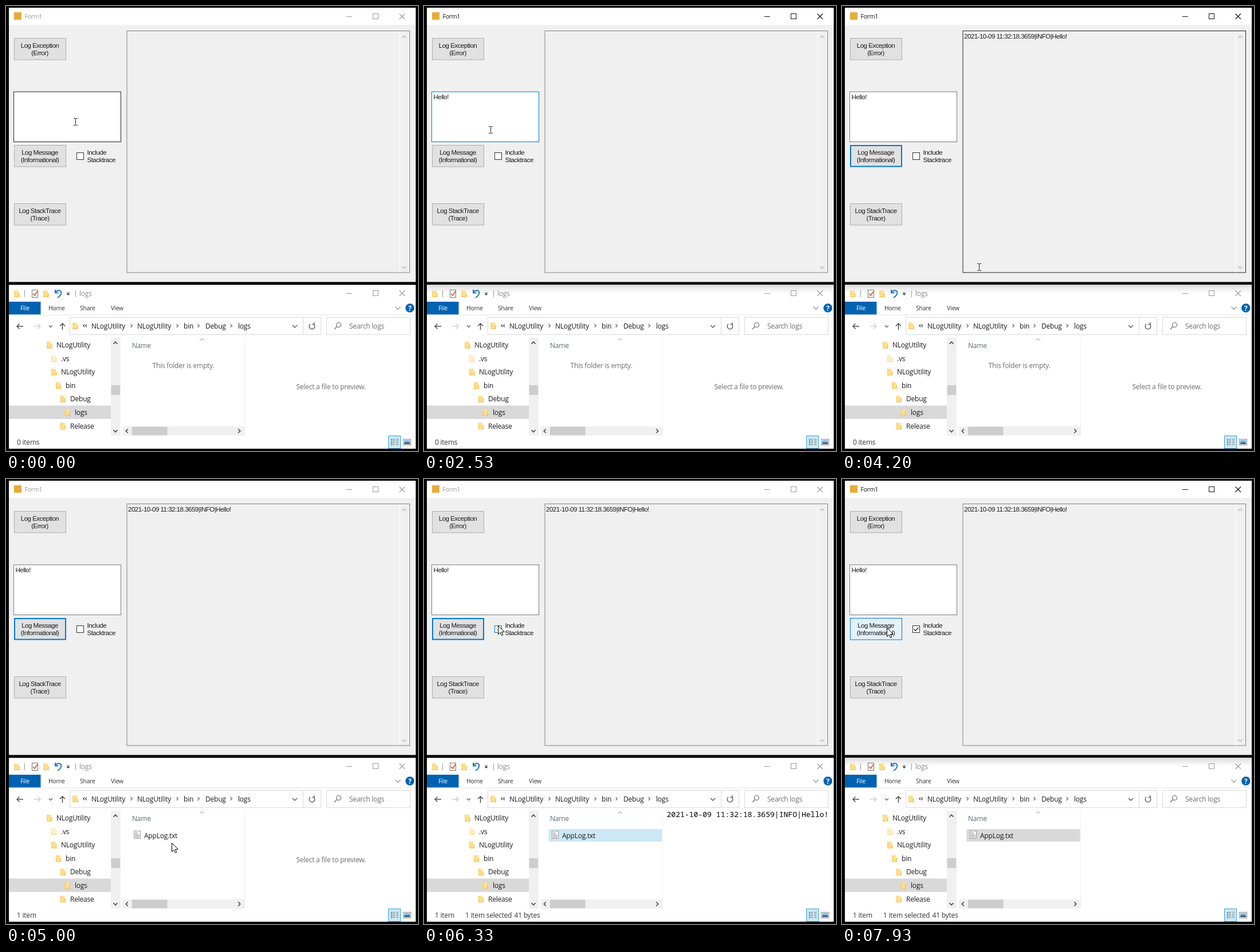
An HTML page with a canvas that plays this animation: 719x778 px, repeating every 8 s.

```html
<!DOCTYPE html>
<html lang="en">
<head>
<meta charset="utf-8">
<title>Log form and folder window</title>
<style>
html, body { margin: 0; width: 100%; height: 100%; overflow: hidden; background: #000; }
canvas { display: block; }
</style>
</head>
<body>
<canvas id="stage" width="719" height="778"></canvas>
<script>
const ctx = document.getElementById('stage').getContext('2d');
const LOOP = 8000, STEP = 1000 / 15;
const BLUE = '#0078d7', GREY = '#7a7a7a', FACE = '#f0f0f0';
const LOG = '2021-10-09 11:32:18.3659|INFO|Hello!';
const FORM_FONT = ['11.5px "Liberation Sans", Arial, sans-serif', '-0.5px'];
const UI_FONT = ['12px "Open Sans", "Noto Sans", sans-serif', '-0.22px'];
const SMALL_FONT = ['10.5px "Open Sans", "Noto Sans", sans-serif', '-0.25px'];
const MONO_FONT = ['13.08px "Noto Sans Mono", "DejaVu Sans Mono", monospace', '0px'];

// Pointer stops: time, x, y
const PATH = [
  [0, 121, 202], [2400, 121, 202], [2600, 113, 222], [2930, 80, 278],
  [3200, 69, 264], [3800, 69, 264], [3930, 98, 298], [4200, 239, 454],
  [4330, 252, 533], [4600, 252, 533], [4870, 285, 652], [5130, 293, 620],
  [5870, 293, 620], [6070, 235, 490], [6330, 129, 256], [7130, 129, 256],
  [7330, 103, 262], [7530, 78, 260], [8000, 78, 260]
];
// Typed letters and when they land
const KEYS = [1000, 1200, 1270, 1400, 1600, 1870];

function rect(x, y, w, h, fill) {
  ctx.fillStyle = fill;
  ctx.fillRect(x, y, w, h);
}

function box(x, y, w, h, fill, line, lw = 1) {
  rect(x, y, w, h, line);
  rect(x + lw, y + lw, w - 2 * lw, h - 2 * lw, fill);
}

function text(str, x, y, font = UI_FONT, color = '#1a1a1a', align = 'left') {
  ctx.font = font[0];
  ctx.letterSpacing = font[1];
  ctx.fillStyle = color;
  ctx.textAlign = align;
  ctx.fillText(str, x, y);
}

function line(color, width, ...pts) {
  ctx.strokeStyle = color;
  ctx.lineWidth = width;
  ctx.beginPath();
  for (let i = 0; i < pts.length; i += 2) ctx.lineTo(pts[i], pts[i + 1]);
  ctx.stroke();
}

function chevron(x, y, dir, color, size = 3.5, width = 1.3) {
  const d = size / 2;
  if (dir === 'up') line(color, width, x - size, y + d, x, y - d, x + size, y + d);
  if (dir === 'down') line(color, width, x - size, y - d, x, y + d, x + size, y - d);
  if (dir === 'left') line(color, width, x + d, y - size, x - d, y, x + d, y + size);
  if (dir === 'right') line(color, width, x - d, y - size, x + d, y, x - d, y + size);
}

function folder(x, y, alpha = 1) {
  ctx.globalAlpha = alpha;
  rect(x - 4.5, y - 5.5, 7.5, 11.5, '#ffdf8a');
  rect(x - 4.5, y - 5.5, 1, 11.5, '#f3c75c');
  rect(x + 3, y - 1, 1.5, 7, '#f0c050');
  rect(x - 4.5, y + 5, 9, 1, '#efc155');
  ctx.globalAlpha = 1;
}

function windowButtons(y, color) {
  line(color, 1, 594, y + .5, 604, y + .5);
  ctx.strokeRect(640.5, y - 4.5, 9, 9);
  line(color, 1.1, 686.5, y - 4.5, 696, y + 5);
  line(color, 1.1, 696, y - 4.5, 686.5, y + 5);
}

function pointerAt(t) {
  let i = 1;
  while (i < PATH.length - 1 && PATH[i][0] < t) i++;
  const [t0, x0, y0] = PATH[i - 1], [t1, x1, y1] = PATH[i];
  const k = Math.min(1, Math.max(0, (t - t0) / (t1 - t0)));
  return { x: x0 + (x1 - x0) * k, y: y0 + (y1 - y0) * k };
}

const inside = (p, x, y, w, h) => p.x >= x && p.x < x + w && p.y >= y && p.y < y + h;

function button(y, first, second, state) {
  const fill = { hover: '#e5f1fb', down: '#cce4f7' }[state] || '#e1e1e1';
  const edge = { hover: BLUE, focus: BLUE, down: '#005499' }[state] || '#adadad';
  box(14, y, 91, 38.5, fill, edge, state === 'focus' ? 2 : 1);
  text(first, 59, y + 17, FORM_FONT, '#1a1a1a', 'center');
  text(second, 59, y + 30, FORM_FONT, '#1a1a1a', 'center');
}

function messageBox(t, p) {
  const focused = t >= 200 && t < 3200;
  let edge = GREY;
  if (focused) edge = BLUE;
  else if (t >= 3200 && t < 3460) edge = t < 3330 ? '#2f86c8' : '#5a83a3';
  else if (inside(p, 13, 149, 188, 89)) edge = '#222';
  box(13, 149.5, 188, 88.5, '#fff', edge);

  const typed = 'Hello!'.slice(0, KEYS.filter(k => t >= k).length);
  text(typed, 16.5, 163, FORM_FONT, '#1a1a1a');
  const lastKey = KEYS.filter(k => t >= k).pop() || 400;
  const caretOn = t >= 400 && t < 3200 && Math.floor((t - lastKey) / 530) % 2 === 0;
  if (caretOn) rect(Math.round(16.5 + ctx.measureText(typed).width), 153, 1, 12, '#000');
}

function checkBox(t, p) {
  const hover = inside(p, 122, 250, 75, 25);
  const down = t >= 6730 && t < 6865;
  const color = down ? '#005499' : hover ? BLUE : '#333';
  box(123, 256, 13, 13, down ? '#cce4f7' : '#fff', color);
  if (t >= 6865) line(color, 1.4, 125.5, 262.5, 128.3, 265.3, 133.5, 259.5);
  text('Include', 141.5, 260, FORM_FONT, '#1a1a1a');
  text('Stacktrace', 141.5, 272.5, FORM_FONT, '#1a1a1a');
}

function drawForm(t, p, active) {
  rect(5, 3, 710, 479.5, FACE);
  rect(5, 3, 710, 30, '#fff');
  rect(14, 11, 13, 13, '#e5ab3c');
  text('Form1', 32.5, 22, SMALL_FONT, active ? '#111' : '#999');
  windowButtons(18, active ? '#111' : '#999');

  let state = 'plain';
  if (inside(p, 14, 243, 91, 39)) {
    state = (t >= 3200 && t < 3260) || (t >= 7865 && t < 7925) ? 'down' : 'hover';
  } else if (t >= 3200 && t < 6730) state = 'focus';
  button(56, 'Log Exception', '(Error)');
  messageBox(t, p);
  button(243, 'Log Message', '(Informational)', state);
  checkBox(t, p);
  button(345, 'Log StackTrace', '(Trace)');

  const hover = inside(p, 211, 43, 494, 424) && active;
  box(210.5, 43, 494.5, 423.5, FACE, hover ? '#222' : '#828282');
  rect(686, 44, 2, 421.5, '#f7f7f7');
  chevron(695, 54, 'up', '#bcbcbc', 3.5, 1.6);
  chevron(695, 457, 'down', '#bcbcbc', 3.5, 1.6);
  if (t >= 3260) text(LOG, 213, 56.5, FORM_FONT, '#1a1a1a');
}

function titleAndRibbon(active) {
  if (active) {
    const shade = ctx.createLinearGradient(0, 488, 0, 502);
    shade.addColorStop(0, '#dedede');
    shade.addColorStop(1, '#fff');
    rect(5, 487.5, 710, 14.5, shade);
  }
  folder(19, 503);
  rect(32, 497, 1, 12, '#999');
  box(45, 496, 11, 14, '#fff', '#777');
  line('#d05a2b', 1.7, 47, 503, 50, 506, 55, 499);
  folder(70, 503);
  ctx.strokeStyle = '#2474bd';
  ctx.lineWidth = 2;
  ctx.beginPath();
  ctx.moveTo(86, 501);
  ctx.bezierCurveTo(91, 495, 98, 497, 96, 503);
  ctx.quadraticCurveTo(95, 507, 90, 510);
  ctx.stroke();
  line('#2474bd', 2, 86, 496, 86, 501.5, 91.5, 501.5);
  rect(106, 501, 5, 1, '#333');
  ctx.fillStyle = '#333';
  ctx.beginPath();
  ctx.moveTo(105.5, 503);
  ctx.lineTo(111.5, 503);
  ctx.lineTo(108.5, 506);
  ctx.fill();
  rect(121, 497, 1, 12, '#999');
  text('logs', 128, 507, UI_FONT, '#888');
  windowButtons(502, '#999');

  rect(5, 517, 55.5, 22.5, '#0063b1');
  text('File', 33, 532, SMALL_FONT, '#fff', 'center');
  text('Home', 74, 532, SMALL_FONT, '#333');
  text('Share', 129, 532, SMALL_FONT, '#333');
  text('View', 183, 532, SMALL_FONT, '#333');
  rect(5, 539.5, 710, 1, '#e3e3e3');
  chevron(684, 528, 'down', '#999', 4.5);
  ctx.fillStyle = '#0063b1';
  ctx.beginPath();
  ctx.arc(704.8, 528, 7.7, 0, 7);
  ctx.fill();
  text('?', 704.8, 532.5, ['bold 12px "Open Sans", sans-serif', '0px'], '#fff', 'center');
}

function addressRow() {
  line('#444', 1.4, 30, 560, 19, 560);
  line('#444', 1.4, 23.5, 555.5, 19, 560, 23.5, 564.5);
  line('#ccc', 1.4, 49, 560, 60, 560);
  line('#ccc', 1.4, 55.5, 555.5, 60, 560, 55.5, 564.5);
  chevron(78, 560, 'down', '#666', 3, 1.4);
  line('#444', 1.4, 98.5, 566, 98.5, 555);
  line('#444', 1.4, 94, 559.5, 98.5, 555, 103, 559.5);

  box(111, 544, 439, 31, '#fff', '#d9d9d9');
  rect(518, 545, 1, 29, '#d9d9d9');
  folder(121, 559);
  chevron(136, 559, 'left', '#333', 2.4, 1.1);
  chevron(139.7, 559, 'left', '#333', 2.4, 1.1);
  const crumbs = [['NLogUtility', 149], ['NLogUtility', 229], ['bin', 310], ['Debug', 348], ['logs', 405]];
  for (const [name, x] of crumbs) text(name, x, 564);
  for (const x of [219, 299, 336, 393]) chevron(x, 559, 'right', '#555', 2.8, 1.1);
  chevron(504, 560, 'down', '#555', 4);
  ctx.strokeStyle = '#555';
  ctx.lineWidth = 1.3;
  ctx.beginPath();
  ctx.arc(534, 560, 4.8, -.7, 4.1);
  ctx.stroke();
  line('#555', 1.3, 534.5, 556.5, 538, 556.5, 538, 553);

  box(559, 544, 147, 31, '#fff', '#d9d9d9');
  ctx.strokeStyle = '#666';
  ctx.lineWidth = 1.1;
  ctx.beginPath();
  ctx.arc(580.5, 557.5, 4, 0, 7);
  ctx.stroke();
  line('#666', 1.2, 577.5, 560.5, 573, 565);
  text('Search logs', 599, 564, UI_FONT, '#6d6d6d');
}

function tree() {
  const rows = [['NLogUtility', 0], ['.vs', 1], ['NLogUtility', 1], ['bin', 2], ['Debug', 3], ['logs', 4], ['Release', 3]];
  rect(5, 698.5, 178, 23.5, '#d9d9d9');
  rows.forEach(([name, depth], i) => {
    const y = 592.5 + i * 23.6;
    folder(76 + depth * 7.8, y, name === '.vs' ? .5 : 1);
    text(name, 88 + depth * 8, y + 4.5);
  });
  rect(183, 580, 17, 171, FACE);
  rect(183.5, 663, 15.5, 17, '#cdcdcd');
  chevron(191, 589, 'up', '#444', 3.5, 1.6);
  chevron(191, 743, 'down', '#444', 3.5, 1.6);
}

function fileList(t, p, active) {
  chevron(342, 583, 'up', '#888', 3.5, 1);
  text('Name', 220, 598, UI_FONT, '#5c6770');
  rect(416, 580, 1, 171, '#f0f0f0');
  rect(204, 735, 212, 16, FACE);
  rect(220, 735.5, 61.5, 15, '#cdcdcd');
  chevron(211, 743, 'left', '#444', 3.5, 1.6);
  chevron(407, 743, 'right', '#444', 3.5, 1.6);

  const listed = t >= 4930, picked = t >= 5260;
  if (!listed) text('This folder is empty.', 309.5, 633, UI_FONT, '#6d6d6d', 'center');
  else {
    const hover = inside(p, 218, 612, 197, 22);
    if (picked) {
      const fill = active ? '#d9d9d9' : '#cce8f7';
      box(217.5, 612, 198, 22, fill, hover ? '#99d1f5' : fill);
    } else if (hover) rect(217.5, 612, 198, 22, '#e5f3ff');
    box(223, 615, 12, 14, '#fff', '#999');
    for (let y = 618; y < 628; y += 2) rect(225, y, y < 621 ? 5 : 8, 1, '#999');
    text('AppLog.txt', 241, 627.5);
  }
  if (!picked) text('Select a file to preview.', 567, 670, UI_FONT, '#6d6d6d', 'center');
  else if (t >= 5330 && t < 7865) text(LOG, 423.5, 590.5, MONO_FONT, '#000');

  text(listed ? '1 item' : '0 items', 19, 767, UI_FONT, '#333');
  if (picked) {
    text('1 item selected', 72, 767, UI_FONT, '#333');
    text('41 bytes', 157.5, 767, UI_FONT, '#333');
  }
}

function viewIcons() {
  box(667, 751, 22, 23, '#cce8f7', '#3aa5d5');
  for (let i = 0; i < 4; i++) {
    rect(672, 757 + i * 3, 2, 2, '#777');
    rect(675, 757 + i * 3, 4, 1, '#777');
    rect(681, 757 + i * 3, 4, 1, '#777');
  }
  box(693, 757, 14, 11, '#fff', '#888');
  rect(695, 759, 10, 7, '#79b7e5');
  rect(695, 763, 10, 3, '#345c7c');
}

function drawExplorer(t, p, active) {
  rect(5, 487.5, 710, 286.5, '#fff');
  titleAndRibbon(active);
  addressRow();
  tree();
  fileList(t, p, active);
  viewIcons();
}

function arrow(x, y) {
  const pts = [0, 0, 0, 15, 3.5, 11.8, 6, 17, 8.3, 16, 6, 11, 10.7, 10.7];
  ctx.beginPath();
  for (let i = 0; i < pts.length; i += 2) ctx.lineTo(x + pts[i], y + pts[i + 1]);
  ctx.closePath();
  ctx.fillStyle = '#fff';
  ctx.fill();
  ctx.strokeStyle = '#000';
  ctx.lineWidth = 1;
  ctx.stroke();
}

function beam(x, y) {
  rect(x, y - 5, 1, 11, '#222');
  for (const end of [-6, 6]) {
    rect(x - 3, y + end, 3, 1, '#222');
    rect(x + 1, y + end, 3, 1, '#222');
  }
}

function drawPointer(t, p) {
  if (t >= 995 && t < 2395) return;
  const x = Math.round(p.x), y = Math.round(p.y);
  const onText = inside(p, 13, 149, 188, 89) || inside(p, 211, 43, 475, 424);
  if (onText) beam(x, y);
  else arrow(x + .5, y + .5);
}

function draw(time) {
  // The picture advances at 15 steps a second
  const t = Math.floor((time + 5) / STEP) * STEP + 4;
  const p = pointerAt(t);
  const active = (t >= 200 && t < 4870) || t >= 6730;
  rect(0, 0, 719, 778, '#000');
  drawForm(t, p, active);
  drawExplorer(t, p, active);
  drawPointer(t, p);
}

const start = performance.now();
function tick() {
  draw((performance.now() - start) % LOOP);
  requestAnimationFrame(tick);
}
tick();
</script>
</body>
</html>
```
